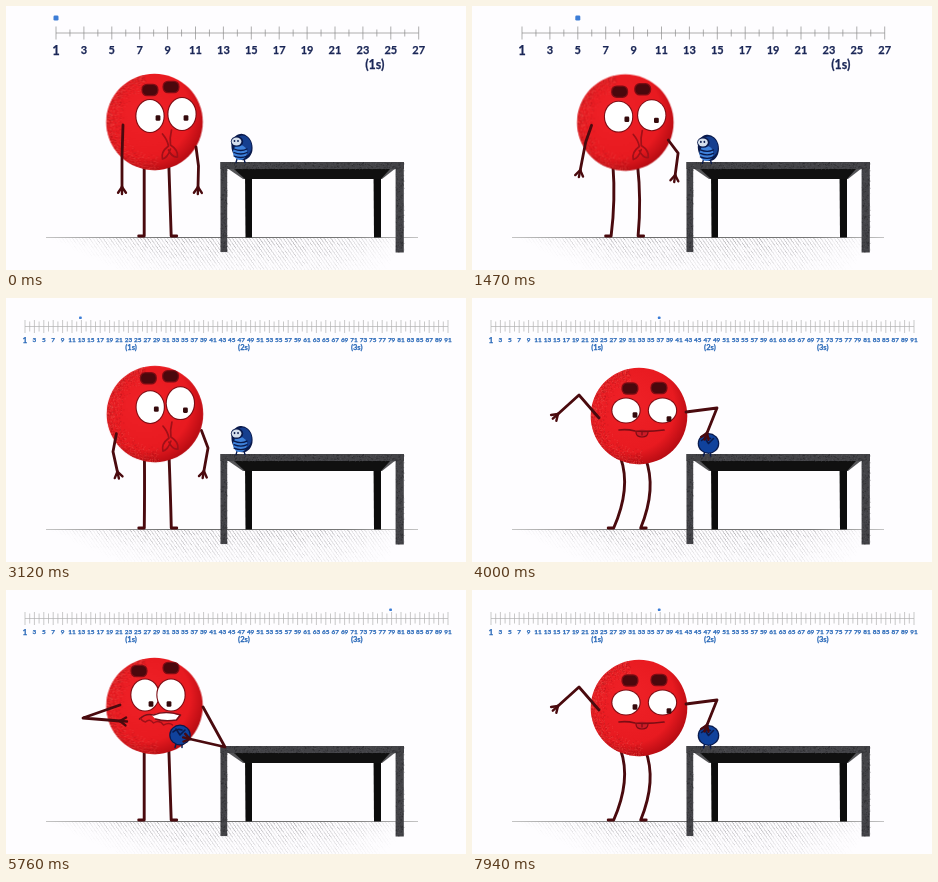
Recreate the animation shown at these times as an HTML page with a canvas. Size 460x264 px, loop 8 s.

```html
<!DOCTYPE html>
<html lang="en">
<head>
<meta charset="utf-8">
<title>Timing study</title>
<style>
html, body { margin: 0; width: 100%; height: 100%; overflow: hidden; background: #fefdff; }
canvas, svg { position: absolute; left: 0; top: 0; width: 460px; height: 264px; }
text { font-family: Lato, "Open Sans", sans-serif; font-weight: 700; text-anchor: middle; }
</style>
</head>
<body>
<canvas id="stage" width="460" height="264"></canvas>
<svg id="rulers" viewBox="0 0 460 264"></svg>
<script>
const ctx = document.getElementById('stage').getContext('2d');
const svg = document.getElementById('rulers');
const LIMB = '#4a0a0e', NAVY = '#0a1a4c', BLUE = '#10429c';

let seed = 7;
const rnd = () => (seed = (seed * 16807) % 2147483647) / 2147483647;

function el(parent, tag, attrs, text) {
  const e = document.createElementNS('http://www.w3.org/2000/svg', tag);
  for (const k in attrs) e.setAttribute(k, attrs[k]);
  if (text) e.textContent = text;
  return parent.appendChild(e);
}

// Rulers: x of the first mark, spacing, number of marks
const shortRule = { x0: 50, step: 13.95, count: 27, y: 27, tall: 6.5, low: 3.5, ink: '#1b2757',
  size: 11, labelY: 48, secY: 63, secSize: 12.5, dotY: 9.5, dot: 5, line: '#8c8c8c' };
const longRule = { x0: 19, step: 4.7, count: 91, y: 28.5, tall: 6.5, low: 5, ink: '#2868b8',
  size: 6.4, labelY: 44, secY: 52, secSize: 7.5, dotY: 18.5, dot: 2.6, line: '#b2b2b2' };

function makeRuler(r) {
  const g = el(svg, 'g', {});
  const x = n => r.x0 + (n - 1) * r.step;
  const label = (x, y, size, text) => el(g, 'text',
    { x, y, 'font-size': size, fill: r.ink, stroke: r.ink, 'stroke-width': 0.25 }, text);
  let d = `M${x(1)} ${r.y}H${x(r.count)}`;
  for (let n = 1; n <= r.count; n++) {
    const h = n % 2 ? r.tall : r.low;
    d += `M${x(n)} ${r.y - h}v${2 * h}`;
    if (n % 2) label(x(n), r.labelY + (n === 1 ? 1 : 0), r.size + (n === 1 ? 2 : 0), String(n));
  }
  el(g, 'path', { d, stroke: r.line, 'stroke-width': 0.7, fill: 'none' });
  for (let s = 1; s * 24 < r.count; s++) label(x(s * 24) - 2, r.secY, r.secSize, `(${s}s)`);
  r.mark = el(g, 'rect', { y: r.dotY, width: r.dot, height: r.dot, rx: r.dot / 4, fill: '#3c7dd6' });
  r.g = g;
}
makeRuler(shortRule);
makeRuler(longRule);

function layer(w, h, draw) {
  const c = document.createElement('canvas');
  c.width = w; c.height = h;
  draw(c.getContext('2d'));
  return c;
}

function poly(c, fill, ...p) {
  c.fillStyle = fill;
  c.beginPath();
  for (let i = 0; i < p.length; i += 2) c.lineTo(p[i], p[i + 1]);
  c.fill();
}

function grain(c, x, y, w, h, count, color) {
  c.fillStyle = color;
  for (let i = 0; i < count; i++) c.fillRect(x + rnd() * w, y + rnd() * h, 0.9, 0.9);
}

// Even diagonal hatching, darkest under the line
const floor = layer(460, 264, c => {
  c.lineWidth = 0.7;
  for (let v = 0; v < 32; v += 2.6) {
    const left = 42 + v * 2, right = 402 - v * 0.6;
    for (let x = left; x < right; x += 3.4) {
      const edge = Math.min(1, (x - left) / 90, (right - x) / 70);
      const a = edge * (0.75 - v / 60) * (0.35 + 0.65 * rnd());
      c.strokeStyle = `rgba(70,70,74,${0.8 * a})`;
      c.beginPath();
      c.moveTo(x, 232 + v);
      c.lineTo(x + 2.6, 234.2 + v);
      c.stroke();
    }
  }
  const ink = c.createLinearGradient(40, 0, 412, 0);
  ink.addColorStop(0, '#c4c4c4');
  ink.addColorStop(0.35, '#6c6c6c');
  ink.addColorStop(0.8, '#777');
  ink.addColorStop(1, '#c4c4c4');
  c.fillStyle = ink;
  c.fillRect(40, 231, 372, 1);
});

const table = layer(460, 264, c => {
  poly(c, '#0c0c0c', 239, 165, 246, 165, 246, 231.5, 239.5, 231.5);
  poly(c, '#0c0c0c', 367.5, 165, 375, 165, 375, 231.5, 368, 231.5);
  poly(c, '#555558', 221, 162, 390, 162, 376, 173, 237, 173);
  poly(c, '#101010', 228, 163, 384, 163, 375, 173, 239, 173);
  const bars = [[214.5, 156, 183.5, 7], [214.5, 156, 6.7, 90], [389.6, 156, 8.2, 90.5]];
  for (const b of bars) {
    c.fillStyle = '#434347';
    c.fillRect(...b);
    grain(c, ...b, b[2] * b[3] / 5, 'rgba(105,105,110,.3)');
    grain(c, ...b, b[2] * b[3] / 5, 'rgba(20,20,24,.35)');
  }
});

const ball = layer(100, 100, c => {
  c.beginPath();
  c.arc(50, 50, 48.3, 0, 7);
  c.clip();
  const g = c.createRadialGradient(38, 38, 10, 42, 42, 60);
  g.addColorStop(0, '#ee2026');
  g.addColorStop(0.7, '#e81a20');
  g.addColorStop(1, '#b50b12');
  c.fillStyle = g;
  c.fillRect(0, 0, 100, 100);
  for (let i = 0; i < 1500; i++) {
    const a = 1.5 + rnd() * 3, r = 48.5 - 17 * rnd() * rnd();
    c.fillStyle = rnd() < 0.5 ? 'rgba(165,20,28,.3)' : 'rgba(240,90,85,.35)';
    c.fillRect(50 + r * Math.cos(a), 50 + r * Math.sin(a), 1, 1);
  }
});

// leg: hip offset, knee bend, foot shift; arms: shoulder, elbow, hand (left, right)
const stand = {
  body: [148.5, 116], leg: [2, 0, 0], arms: [117, 119, 116, 150, 116, 181, 190, 141, 192.5, 160, 192, 181],
  eyes: [144, 110, 176, 108], lid: [16], pupils: [152, 112, 180, 112],
  brows: [144, 84, 165, 81], bug: [235, 142], mouth: 'pucker'
};
const ready = { ...stand, arms: [110, 136, 107, 155, 112, 175, 195, 133, 201, 151, 197, 174],
  eyes: [144, 109, 174, 105], pupils: [150, 111, 179, 112], brows: [142, 80, 164, 78] };
const grab = {
  body: [167, 118], leg: [-6, 7, 3.5], arms: [127, 120, 107, 97, 86, 116, 214, 114, 245, 110, 235, 135],
  eyes: [154, 112.5, 190.5, 112.5], lid: [12], pupils: [163, 117, 197, 121],
  brows: [158, 90.5, 187, 90], bug: [236.5, 145.5], mouth: 'tongue'
};
const liftFast = {
  body: [142.3, 108.5], leg: [3.5, 0, 1], arms: [116, 113, 76, 107, 112, 125, 191, 109, 221, 130, 190, 139],
  eyes: [134, 103, 169, 98], lid: [16], pupils: [143, 110, 173, 105],
  brows: [131, 71, 156, 70], bug: [183, 141], mouth: 'smile'
};
const liftSlow = { ...liftFast, body: [146, 109.5], leg: [-2, 0, 2],
  arms: [118, 113, 76, 108, 112, 125, 191, 113, 237, 126, 206, 132],
  eyes: [136, 103, 168, 98], pupils: [143, 110, 173, 106], brows: [133, 71, 157, 70.5],
  bug: [200, 136], mouth: 'wavy' };
const hold = {
  body: [148.5, 116], leg: [2, 0, 0], arms: [114, 115, 77, 128, 114, 131, 197, 117, 219, 157, 184, 149],
  eyes: [139, 105, 165, 105], lid: [15.5], pupils: [145, 114, 163, 114],
  brows: [133, 81, 165, 78], bug: [174, 145], mouth: 'teeth'
};

const quick = [[1, stand], [3, stand], [9, grab], [11, grab], [15, liftFast], [17, liftFast], [19, hold]];
const slow = [[1, stand], [5, ready], [11, ready], [33, grab], [41, grab],
  [57, liftSlow], [63, liftSlow], [77, hold]];

function poseAt(keys, n) {
  let i = 0;
  while (i < keys.length - 1 && keys[i + 1][0] <= n) i++;
  const [n0, a] = keys[i];
  if (i === keys.length - 1) return { ...a, sitting: false };
  const [n1, b] = keys[i + 1];
  const t = (n - n0) / (n1 - n0), k = t * t * (3 - 2 * t), out = {};
  for (const part in a) {
    out[part] = part === 'mouth' ? (k < 0.5 ? a : b).mouth
      : a[part].map((v, j) => v + (b[part][j] - v) * k);
  }
  out.sitting = a.mouth === 'pucker' && k < 0.95;
  return out;
}

function line(p, color, width) {
  ctx.strokeStyle = color;
  ctx.lineWidth = width;
  ctx.beginPath();
  for (let i = 0; i < p.length; i += 2) ctx.lineTo(p[i], p[i + 1]);
  ctx.stroke();
}

function oval(x, y, rx, ry, fill, turn = 0) {
  ctx.fillStyle = fill;
  ctx.beginPath();
  ctx.ellipse(x, y, rx, ry, turn, 0, 7);
  ctx.fill();
}

function pad(x, y, w, h, r, fill) {
  ctx.fillStyle = fill;
  ctx.beginPath();
  ctx.roundRect(x - w / 2, y - h / 2, w, h, r);
  ctx.fill();
}

function curve(d, color, width) {
  ctx.strokeStyle = color;
  ctx.lineWidth = width;
  ctx.stroke(new Path2D(d));
}

function arm(p) {
  line(p, LIMB, 2.8);
  const [, , ex, ey, hx, hy] = p, dir = Math.atan2(hy - ey, hx - ex);
  for (const spread of [-0.6, 0, 0.6]) {
    const a = dir + spread;
    line([hx, hy, hx + 7 * Math.cos(a), hy + 7 * Math.sin(a)], LIMB, 2.4);
  }
}

const mouths = {
  pucker() {
    curve('M8 12q5 6 6 12q-8 6-6 13q5-1 8-10M17 8q-2 8-1 15q8 5 7 12q-5 1-9-7', '#a01018', 1.7);
  },
  smile() {
    curve('M-11 15q14 11 45-2M-13 14q2 0 3 3M33 11q2 1 2 4', '#8c0f17', 1.8);
  },
  wavy() {
    curve('M-12 18q10 1 17-2q7-3 12 1q5-5 11-5M-13 16v4M27 10l2 4', '#7c0d14', 1.7);
  },
  tongue() {
    oval(3, 17.5, 6, 4, '#ce1b27');
    curve('M-3 16q0 5 6 5q6 0 6-5M3 16v3', '#7c0d14', 1.2);
    curve('M-20 14q8-1 16 1q14 1 29-1', '#7c0d14', 1.7);
  },
  teeth() {
    ctx.fillStyle = '#fff';
    ctx.fill(new Path2D('M-3 9q12-5 28 0l-4 5q-12 2-20-1z'));
    curve('M-15 13q6-6 14-4q12-5 27 0l-4 5q-12 2-21-1', '#75111a', 1.6);
    curve('M-14 12q1 3 5 4q4-4 8 1q6-4 10 2q6-3 9 0', '#a01018', 1.5);
  }
};

function bug(p) {
  ctx.save();
  ctx.translate(...p.bug);
  if (p.sitting) {
    line([-4, 11, -5, 14.5], NAVY, 1.4);
    line([3, 11, 4, 14.5], NAVY, 1.4);
    oval(1, -1, 10.5, 13.2, NAVY, -0.15);
    oval(2, -2, 8.5, 10.5, '#163f8f', -0.15);
    oval(-1, 4.5, 7, 7.5, '#3f82db');
    for (const y of [1, 4.5, 8]) curve(`M-7 ${y}q7 3 13 0`, NAVY, 1.3);
    oval(-4, -6.5, 6.2, 5.3, NAVY);
    oval(-4.5, -6.5, 4.9, 4, '#d5dfec');
    oval(-6.5, -7, 0.9, 1.1, NAVY);
    oval(-3, -7, 0.9, 1.1, NAVY);
  } else {
    line([-4, 9, -5, 12.5], NAVY, 1.5);
    line([2, 9, 2, 12.5], NAVY, 1.5);
    oval(0, 0, 10.8, 10.4, NAVY);
    oval(0, 0, 9.6, 9.2, BLUE);
    curve('M-7-3q4-4 9-2M-4-6l4 6l5-5', NAVY, 1.6);
  }
  ctx.restore();
}

function drawHero(p) {
  const [cx, cy] = p.body, [sway, bend, shift] = p.leg;
  for (const side of [-1, 1]) {
    const hip = cx + sway + side * 12.3, foot = 151.7 + side * 13.5 + shift;
    const kneeX = (hip + foot) / 2 + 2 * bend, kneeY = (cy + 276) / 2 - bend;
    curve(`M${hip} ${cy + 42}Q${kneeX} ${kneeY} ${foot} 230h${side * 5.5}`, LIMB, 2.9);
  }
  ctx.drawImage(ball, cx - 50, cy - 50);
  for (const i of [0, 2]) {
    pad(p.brows[i], p.brows[i + 1], 17, 12.5, 5.5, '#7d0c13');
    pad(p.brows[i], p.brows[i + 1], 14.5, 10, 4.5, '#4a080d');
    oval(p.eyes[i], p.eyes[i + 1], 14.7, p.lid[0] + 1, '#7d0c13');
    oval(p.eyes[i], p.eyes[i + 1], 13.6, p.lid[0], '#fff');
  }
  for (const i of [0, 2]) pad(p.pupils[i], p.pupils[i + 1], 4.8, 5.4, 1.3, '#340a0c');
  ctx.save();
  ctx.translate(cx, cy);
  mouths[p.mouth]();
  ctx.restore();
}

// Two quick takes, then the long one; each holds its last drawing
const cuts = [[0, shortRule], [1290, shortRule], [2590, longRule], [6540, longRule]];
const pace = [[0, 1], [1395, 37], [2430, 61], [3230, 81], [3630, 91]];

function count(r, t) {
  if (r === shortRule) return 1 + t / 40;
  let i = 0;
  while (i < pace.length - 2 && pace[i + 1][0] <= t) i++;
  const [t0, n0] = pace[i], [t1, n1] = pace[i + 1];
  return n0 + (n1 - n0) * (t - t0) / (t1 - t0);
}

function draw(now) {
  const t = now % 8000;
  const [start, r] = cuts.filter(c => c[0] <= t).pop();
  const raw = Math.min(r.count, count(r, t - start));
  const n = 1 + 2 * Math.floor((raw - 1) / 2 + 1e-6); // animated on twos
  const p = poseAt(r === shortRule ? quick : slow, n);

  shortRule.g.style.display = r === shortRule ? '' : 'none';
  longRule.g.style.display = r === longRule ? '' : 'none';
  r.mark.setAttribute('x', r.x0 + (n - 1) * r.step - r.dot / 2 - (r === longRule ? 1 : 0));

  ctx.fillStyle = '#fefdff';
  ctx.fillRect(0, 0, 460, 264);
  ctx.lineCap = ctx.lineJoin = 'round';
  ctx.drawImage(floor, 0, 0);
  drawHero(p);
  ctx.drawImage(table, 0, 0);
  bug(p);
  arm(p.arms.slice(0, 6));
  arm(p.arms.slice(6));
}

const begin = performance.now();
function tick() {
  draw(performance.now() - begin);
  requestAnimationFrame(tick);
}
tick();
</script>
</body>
</html>
```
